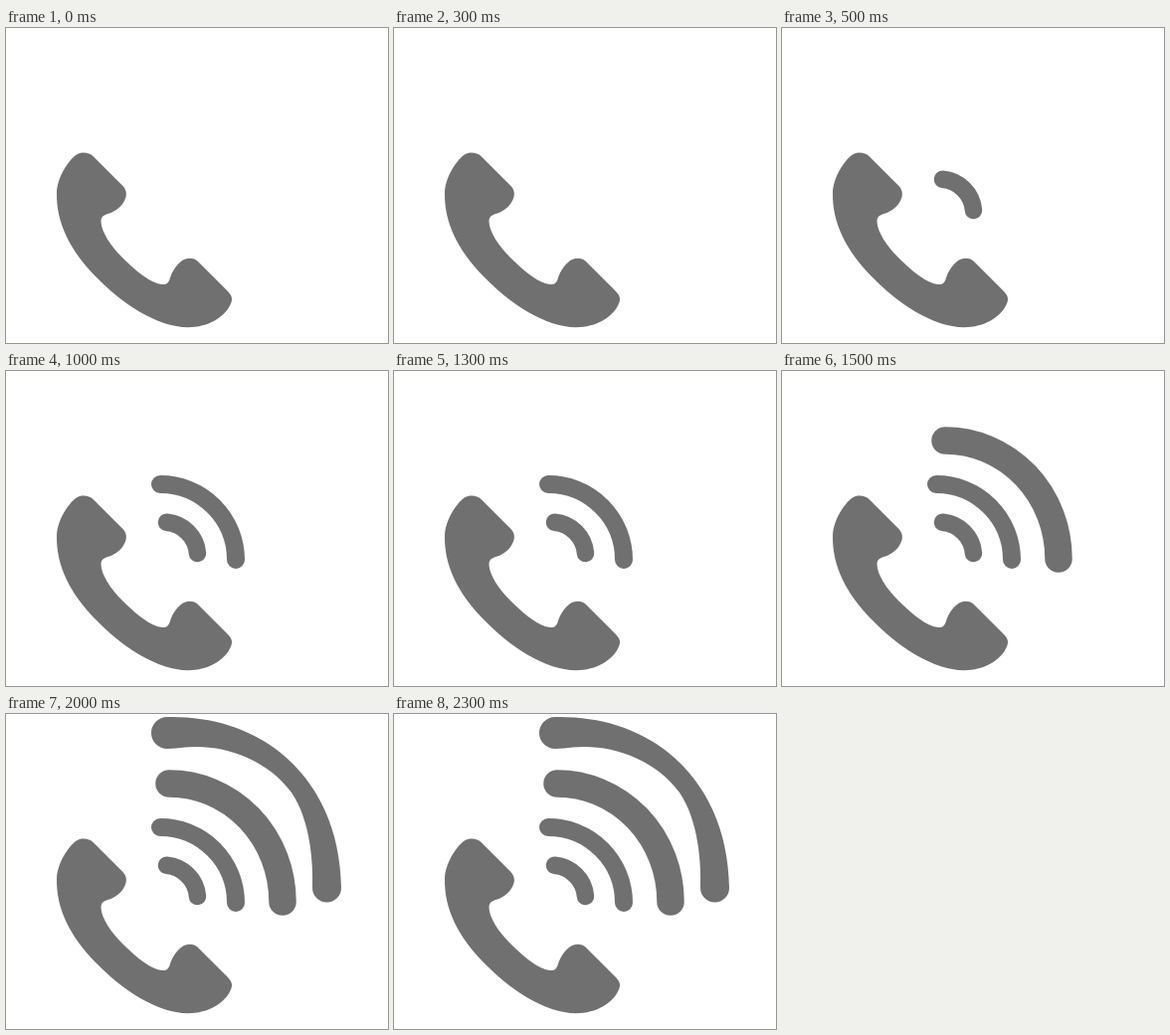
These frames come from a looping animation (384x317 px, 2500 ms). An HTML page:

```html
<!DOCTYPE html>
<html lang="en">
<head>
<meta charset="utf-8">
<title>Ringing phone</title>
<style>
html, body { margin: 0; width: 100%; height: 100%; overflow: hidden; background: #fff; }
svg { display: block; width: 100vw; height: 100vh; }
.wave { visibility: hidden; }
.line { fill: none; stroke: #707070; stroke-linecap: round; }
</style>
</head>
<body>
<svg viewBox="0 0 384 317" fill="#707070">
  <path d="M78 125.5 C82 125.5 85 126.5 88 129.5 L117 158.5 C120.5 162 122 166.5 120 171.5
    C117.5 178.5 111 184 104 186.500 C98.5 188 95.5 189.5 95.5 195 C96 205 105 219 116 230
    C128 242 141 253.500 152 257 C158 258.5 162.5 259 164.5 253 C167 244 173 236 179 233
    C184.5 230.8 189 231.3 193 235 L222 264 C226 268 228.2 271.5 226.5 276
    C221 291 203 301.2 183 301.2 C152 301.2 116 277 89.5 249.5 C64 223 50.5 196 51 166
    C51.5 150 62.5 134 70 128 C73 126 75.5 125.5 78 125.5 Z"/>
  <path class="wave line" stroke-width="17.5" d="M161.5 152.3 A34 34 0 0 1 192.5 183.5"/>
  <path class="wave line" stroke-width="18" d="M155 114 A76 76 0 0 1 231 190"/>
  <path class="wave line" stroke-width="27.5" d="M164 70 A114 119 0 0 1 278 189"/>
  <path class="wave" d="M162 3 C203 2 244 13 276 39 C314 70 336 116 337 175
    A14.5 14.5 0 0 1 308 175 C309 150 306 107 287 79 C262 45 218 30 180 33.5
    C174 34 168 35 162 35 A16 16 0 0 1 162 3 Z"/>
</svg>
<script>
const STEP = 500;
const waves = [...document.querySelectorAll('.wave')];

function draw(t) {
  const count = Math.floor(t / STEP) % (waves.length + 1);
  waves.forEach((w, i) => w.style.visibility = i < count ? 'visible' : 'hidden');
}

const start = performance.now();
function tick() {
  draw(performance.now() - start);
  requestAnimationFrame(tick);
}
tick();
</script>
</body>
</html>
```
